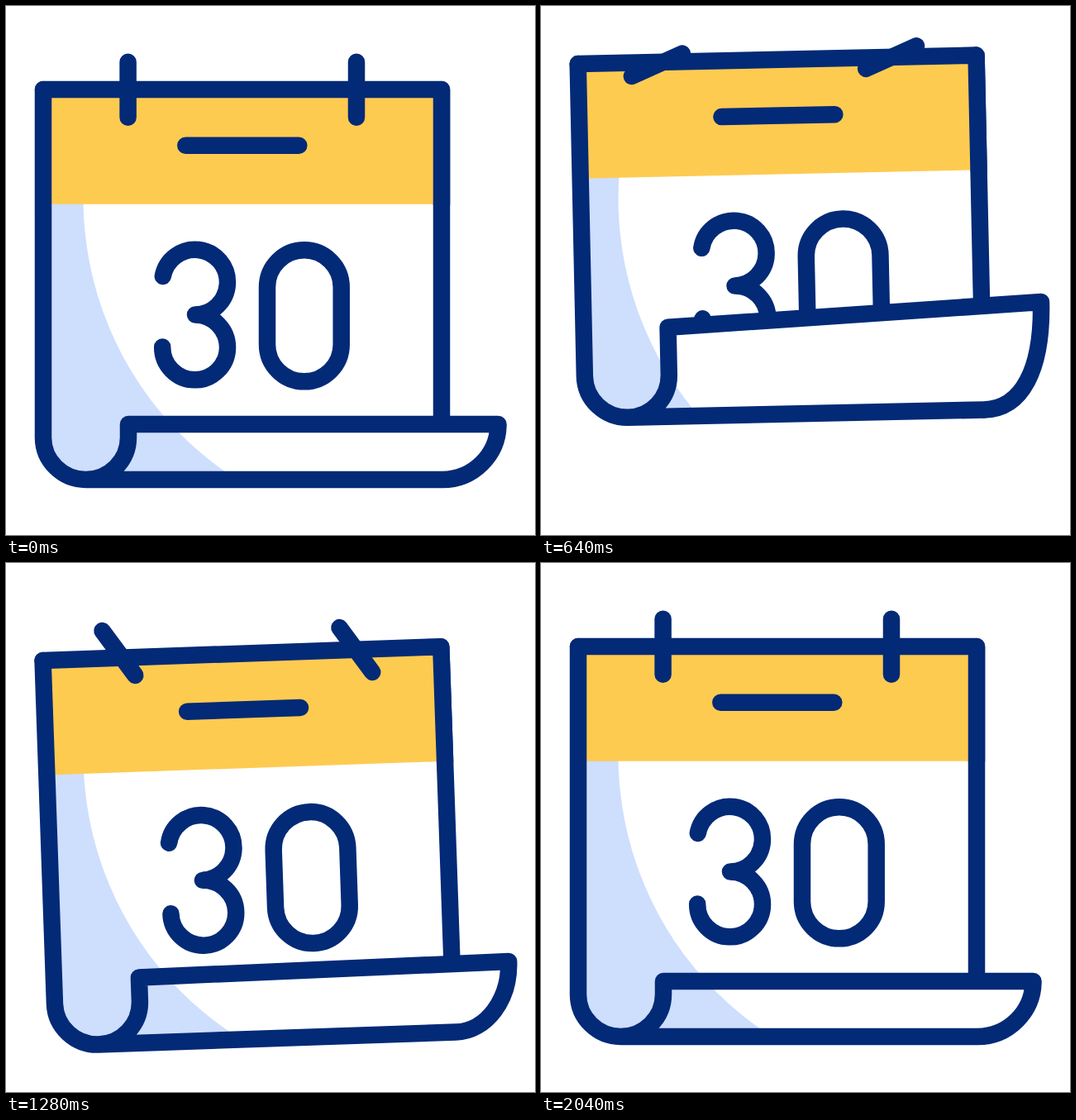
Recreate the animation shown at these times as an HTML page without scripts. Size 640 by 640 pixels, loop 3000 ms.

```html
<!DOCTYPE html>
<html lang="en">
<head>
<meta charset="utf-8">
<title>Calendar</title>
<style>
html, body { margin: 0; width: 100%; height: 100%; overflow: hidden; background: #fff; }
svg { display: block; width: 100vw; height: 100vh; }

.line { fill: none; stroke: #032a76; stroke-width: 20.5; stroke-linecap: round; stroke-linejoin: round; }
.body, .curl, .shade, .ring, .drift {
  animation: 3s cubic-bezier(.333, 0, .667, 1) infinite;
}
.body { transform-origin: 286px 118px; animation-name: swing, hop; }
.curl { animation-name: curl; }
.shade { animation-name: shade; }
.drift { animation-name: drift; }
.ring { transform-box: fill-box; transform-origin: center; animation-name: ring; }

@keyframes swing {
  0% { rotate: 0deg; }
  13.83% { rotate: -3.45deg; }
  33.5% { rotate: 3.3deg; }
  43% { rotate: -2deg; }
  65.3%, 100% { rotate: 0deg; }
}
@keyframes hop {
  0% { translate: 0 0; }
  10.8% { translate: 0 20px; }
  23.83% { translate: 0 -42px; animation-timing-function: cubic-bezier(.333, 0, .56, 1); }
  37.33% { translate: 0 22px; }
  46.67%, 100% { translate: 0 0; }
}
@keyframes ring {
  0% { rotate: 0deg; }
  10.67% { rotate: -17deg; }
  21.33% { rotate: 67deg; animation-timing-function: cubic-bezier(.3, 0, .6, 1); }
  46.33% { rotate: -39deg; animation-timing-function: cubic-bezier(.5, 0, .7, 1); }
  68%, 100% { rotate: 0deg; }
}
/* the left ring also slips along the edge */
@keyframes drift {
  0%, 10.67% { translate: 0 0; }
  21.33% { translate: -7px 3px; }
  32% { translate: -5.5px -10px; }
  42.67% { translate: -10.5px -6px; }
  57.33%, 100% { translate: 0 0; }
}
/* rolled lower edge of the page */
@keyframes curl {
  0%, 68%, 100% { d: path("M45 101V522C45 550.2 68.3 573 96.5 573H528C565 573 595.5 543 595.5 506L148 506V522C148 550 125 573 96.5 573"); }
  10.67% { d: path("M45 101V545.5C45 573.7 68.3 596.5 96.5 596.5H528C565 596.5 595.5 566.5 595.5 529.5L148 529.5V545.5C148 573.5 125 596.5 96.5 596.5"); }
  21.33% { d: path("M45 101V479C45 507.2 68.3 530 96.5 530H527C573 530 599 483 599 401L147 422V479C147 507 125 530 96.5 530"); animation-timing-function: cubic-bezier(.33, 0, .6, .85); }
  32% { d: path("M45 101V520C45 548.2 68.3 571 96.5 571H530C566 571 596 534 596 489.5L148 493V520C148 548 125 571 96.5 571"); animation-timing-function: cubic-bezier(.3, .6, .67, 1); }
  36.67% { d: path("M45 101V523C45 551.2 68.3 574 96.5 574H529C566 574 595.5 540 595.5 498L148 500V523C148 551 125 574 96.5 574"); }
  52% { d: path("M45 101V504.5C45 532.7 68.3 555.5 96.5 555.5H528C566 555.5 596 512 596 458.5L148 466V504.5C148 532.5 125 555.5 96.5 555.5"); }
}
@keyframes shade {
  0%, 68%, 100% { translate: 0 0; }
  10.67% { translate: 0 23.5px; }
  21.33% { translate: 0 -43px; animation-timing-function: cubic-bezier(.33, 0, .6, .85); }
  32% { translate: 0 -2px; animation-timing-function: cubic-bezier(.3, .6, .67, 1); }
  36.67% { translate: 0 1px; }
  52% { translate: 0 -17.5px; }
}
</style>
</head>
<body>
<svg viewBox="0 0 640 640">
  <mask id="lit" maskUnits="userSpaceOnUse" x="0" y="0" width="640" height="640">
    <rect width="640" height="640" fill="#fff"/>
    <circle cx="497.5" cy="233" r="404" fill="#000"/>
  </mask>

  <g class="body">
    <g class="line">
      <path d="M527 101V530"/>
      <path d="M189.8 327A39.4 39.4 0 1 1 229 373.5A39.4 39.4 0 1 1 189.2 412.5"/>
      <rect x="316" y="295.3" width="89.7" height="159" rx="44.85"/>
    </g>
    <path class="curl" fill="#fff" d="M45 101V522C45 550.2 68.3 573 96.5 573H528C565 573 595.5 543 595.5 506L148 506V522C148 550 125 573 96.5 573"/>
  </g>

  <!-- the light edge stays still while the page moves -->
  <g mask="url(#lit)">
    <g class="body">
      <path class="shade" fill="#cedefd" d="M45 160V522C45 550.2 68.3 573 96.5 573H420V160Z"/>
    </g>
  </g>

  <g class="body">
    <rect x="45" y="101" width="482" height="138.7" fill="#fecb51"/>
    <g class="line">
      <path d="M527 240V101H45"/>
      <path class="curl" d="M45 101V522C45 550.2 68.3 573 96.5 573H528C565 573 595.5 543 595.5 506L148 506V522C148 550 125 573 96.5 573"/>
      <path d="M217.3 168.8H354.3"/>
      <g class="drift"><path class="ring" d="M147.6 67.8V134.8"/></g>
      <path class="ring" d="M424 67.8V134.8"/>
    </g>
  </g>
</svg>
</body>
</html>
```
